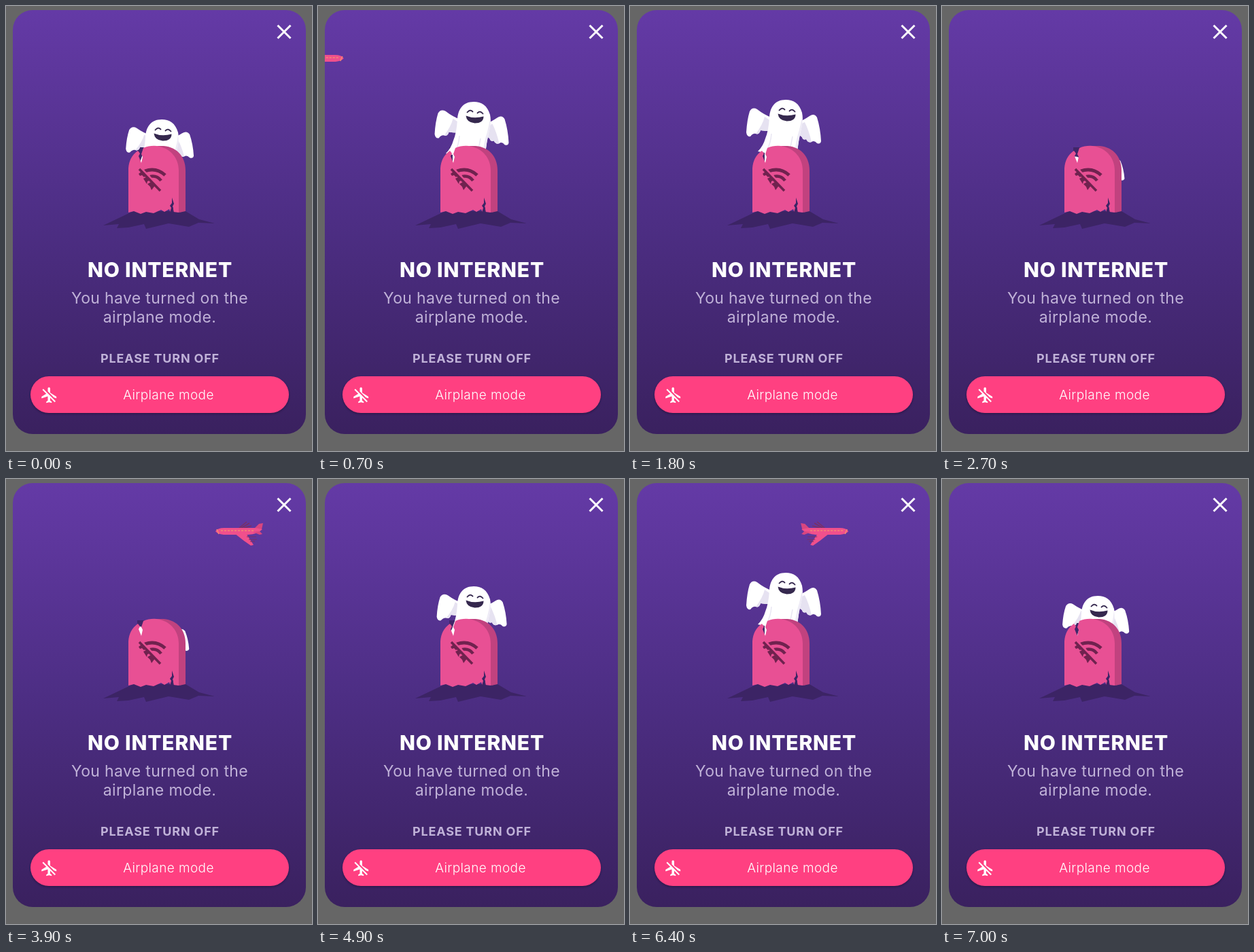
These frames come from a looping animation (450 by 655 pixels, 7.1 s). An HTML page:

```html
<!DOCTYPE html>
<html lang="en">
<head>
<meta charset="utf-8">
<title>No internet</title>
<style>
  html, body { margin: 0; width: 100%; height: 100%; overflow: hidden; background: #666; }
  svg { display: block; width: 450px; height: 655px; }
  text { font-family: Inter, "Open Sans", sans-serif; text-anchor: middle; }
</style>
</head>
<body>
<svg viewBox="0 0 450 655">
  <defs>
    <linearGradient id="night" x1="0" y1="0" x2="0" y2="1">
      <stop offset="0" stop-color="#643aa6"/>
      <stop offset=".5" stop-color="#4d2e84"/>
      <stop offset="1" stop-color="#3a215f"/>
    </linearGradient>
    <filter id="soft" x="-5%" y="-20%" width="110%" height="150%">
      <feGaussianBlur stdDeviation="1.6"/>
    </filter>
    <clipPath id="card"><rect x="10" y="6" width="431" height="624" rx="29"/></clipPath>
    <clipPath id="above"><path d="M10 0H441V290H10Z"/></clipPath>
  </defs>

  <rect width="450" height="655" fill="#666"/>
  <rect x="10" y="6" width="431" height="624" rx="29" fill="url(#night)"/>

  <g clip-path="url(#card)">
    <g id="plane">
      <path d="M-35-5L-46-14M-38-5L-50-12M-42-5L-53-8" stroke="#7c2f62" stroke-width="1.5"/>
      <path d="M-57-4L-64-11-70-12-68-3-64 0Z" fill="#d9467f"/>
      <path d="M0 0Q-3-5-13-5L-58-5-69-3Q-62 4-48 5L-12 5Q-3 4 0 0Z" fill="#f0508c"/>
      <path d="M-8-1H-56" stroke="#f58a72" stroke-width="1.6" stroke-dasharray="3 2"/>
      <path d="M-28 3L-45 3-56 20-52 21-42 14Z" fill="#f0508c"/>
      <path d="M-46 8H-60M-49 12H-61M-51 15H-58" stroke="#7c2f62" stroke-width="1.2"/>
      <path d="M-2-3L-5 4" stroke="#f58a72" stroke-width="1.5"/>
      <path d="M-55 1L-65 5-69 4-65 0Z" fill="#d9467f"/>
    </g>
  </g>

  <path d="M143 323L166 312 187 302H264L284 314 307 320 283 319 269 325 239 320 206 328 203 321 180 326 163 327 166 321Z" fill="#3c2465"/>
  <path d="M193 208L205 208 202 233 193 224Z" fill="#402669"/>

  <g clip-path="url(#above)">
    <g id="armL">
      <path d="M210 165Q197 160 187 152Q180 148 176 155Q172 168 171 186Q172 193 177 192Q181 187 185 188Q190 190 192 183Q198 184 204 184Z" fill="#fff"/>
      <path d="M185 188Q190 190 192 183Q198 184 204 184L207 169L198 163Q195 175 185 188Z" fill="#e6e2f1"/>
    </g>
    <g id="armR">
      <path d="M249 170Q257 167 264 162Q271 157 275 164Q280 180 281 199Q280 204 275 202Q271 197 267 200Q262 202 259 196Q254 198 253 193Q249 190 245 187Z" fill="#fff"/>
      <path d="M253 193Q255 198 259 196Q262 202 267 200Q263 183 257 171L250 174V190Z" fill="#e6e2f1"/>
    </g>
    <g id="body">
      <path d="M229 138C213 138 206 149 205 164Q204 183 199 195Q196 206 188 214L198 216V270H246V213Q248 196 252 180Q255 167 253 157C249 143 240 138 229 138Z" fill="#fff"/>
      <path d="M253 160Q255 172 251 184Q248 198 246 214L242 214Q245 194 249 182Q252 171 253 160Z" fill="#eeebf6"/>
      <path d="M208 188Q207 202 201 213M239 192L235 213" fill="none" stroke="#e9e6f3" stroke-width="1.5"/>
      <g transform="translate(-.5 -1.5)">
        <path d="M220 155Q224 150 228 154M235 156Q239 152 243 157" fill="none" stroke="#35284e" stroke-width="1.8" stroke-linecap="round"/>
        <path d="M218 160Q230 165 244 161Q244 171 231 171Q219 170 218 160Z" fill="#35284e"/>
      </g>
    </g>
  </g>

  <path d="M222 206H232C252 208 264 222 264 242V302L255 304 249 301V230Z" fill="#c1427f"/>
  <path d="M180 304V239Q181 222 194 213L197 217 195 221 199 231 201 222 199 218 202 209Q211 205 222 206C242 209 254 224 254 242V304L246 303 246 295 242 304 240 299 233 303 228 300 217 305 206 303 198 306 188 302Z" fill="#e85094"/>
  <path d="M244 282L247 291 245 295 247 304 241 304 243 297 241 294 244 290Z" fill="#3c2465"/>

  <g fill="none" stroke="#70224f" stroke-width="5">
    <path d="M204 243Q221 237 234 249"/>
    <path d="M212 251Q222 249 228 257" stroke-width="4.5"/>
    <path d="M196 240L227 272" stroke-width="3.6"/>
  </g>
  <path d="M195 247L200 243 206 249 203 252 200 249 197 250ZM202 254L208 251 213 256 208 258 207 262ZM208 262L215 258 220 263 214 271 212 266Z" fill="#70224f"/>
  <path d="M198 237L230 270" stroke="#e85094" stroke-width="1.6"/>

  <path d="M399.5 28.500L418.500 47.500M418.500 28.500L399.500 47.500" stroke="#fff" stroke-width="3"/>

  <text x="226.500" y="399" font-size="30" font-weight="800" letter-spacing=".8" fill="#fff">NO INTERNET</text>
  <g font-size="23" letter-spacing=".35" fill="#c0b2d8">
    <text x="226" y="438">You have turned on the</text>
    <text x="226" y="466">airplane mode.</text>
  </g>
  <text x="226.500" y="525" font-size="18" font-weight="700" letter-spacing=".8" fill="#c0b2d8">PLEASE TURN OFF</text>

  <rect x="36" y="546.500" width="380" height="54" rx="27" fill="#180b2b" opacity=".45" filter="url(#soft)"/>
  <rect x="36" y="545" width="380" height="54" rx="27" fill="#ff4081"/>
  <path transform="translate(50 559) scale(1.15)" fill="#fff" d="M13 9V3.500c0-.83-.67-1.500-1.500-1.500S10 2.670 10 3.500v3.680l7.830 7.830L21 16v-2l-8-5zM3 5.270l4.990 4.990L2 14v2l8-2.500V19l-2 1.500V22l3.500-1 3.500 1v-1.500L13 19v-3.730L18.730 21 20 19.730 4.270 4z"/>
  <text x="239" y="579" font-size="19" font-weight="300" letter-spacing=".4" fill="#fff">Airplane mode</text>
</svg>
<script>
  const LOOP = 7100, STEP = 100;
  const get = id => document.getElementById(id);
  const plane = get('plane'), body = get('body'), armL = get('armL'), armR = get('armR');

  // [time, how far the ghost has sunk]
  const sink = [[0, 29], [200, 20], [450, 10], [700, 3], [900, 0], [1800, 0], [1950, 7],
    [2150, 34], [2500, 74], [3500, 74], [3900, 69], [4300, 52], [4700, 29], [4900, 20],
    [5150, 10], [5400, 3], [5600, 0], [6650, 0], [6800, 7], [7000, 34], [7100, 46]];

  // one-way trips: start, end, nose position at start, px per ms, facing
  const trips = [
    { from: 500, to: 1900, x: -51, speed: .444, dir: 1 },
    { from: 3500, to: 4900, x: 476, speed: -.42, dir: -1 },
    { from: 5600, to: 7000, x: -34, speed: .444, dir: 1 }
  ];

  function at(keys, t) {
    const i = keys.findIndex(k => k[0] > t);
    const [t0, a] = keys[i - 1], [t1, b] = keys[i];
    return a + (b - a) * (t - t0) / (t1 - t0);
  }

  // arms fold inwards and shorten from the shoulder as the ghost sinks
  function fold(arm, d, dx, dy, top) {
    arm.setAttribute('transform',
      `translate(${d * dx} ${top + d * dy}) scale(1 ${1 - d * .0035}) translate(0 ${-top})`);
  }

  function draw(t) {
    const d = at(sink, t);
    body.setAttribute('transform', `translate(0 ${d})`);
    fold(armL, d, .18, .96, 150);
    fold(armR, d, -.17, .88, 160);

    const trip = trips.find(p => t >= p.from && t < p.to);
    plane.style.display = trip ? '' : 'none';
    if (trip) {
      const x = trip.x + (t - trip.from) * trip.speed;
      plane.setAttribute('transform', `translate(${x} 77) scale(${trip.dir} 1)`);
    }
  }

  const start = performance.now();
  function tick() {
    const t = (performance.now() - start) % LOOP;
    draw(Math.floor(t / STEP) * STEP);
    requestAnimationFrame(tick);
  }
  tick();
</script>
</body>
</html>
```
